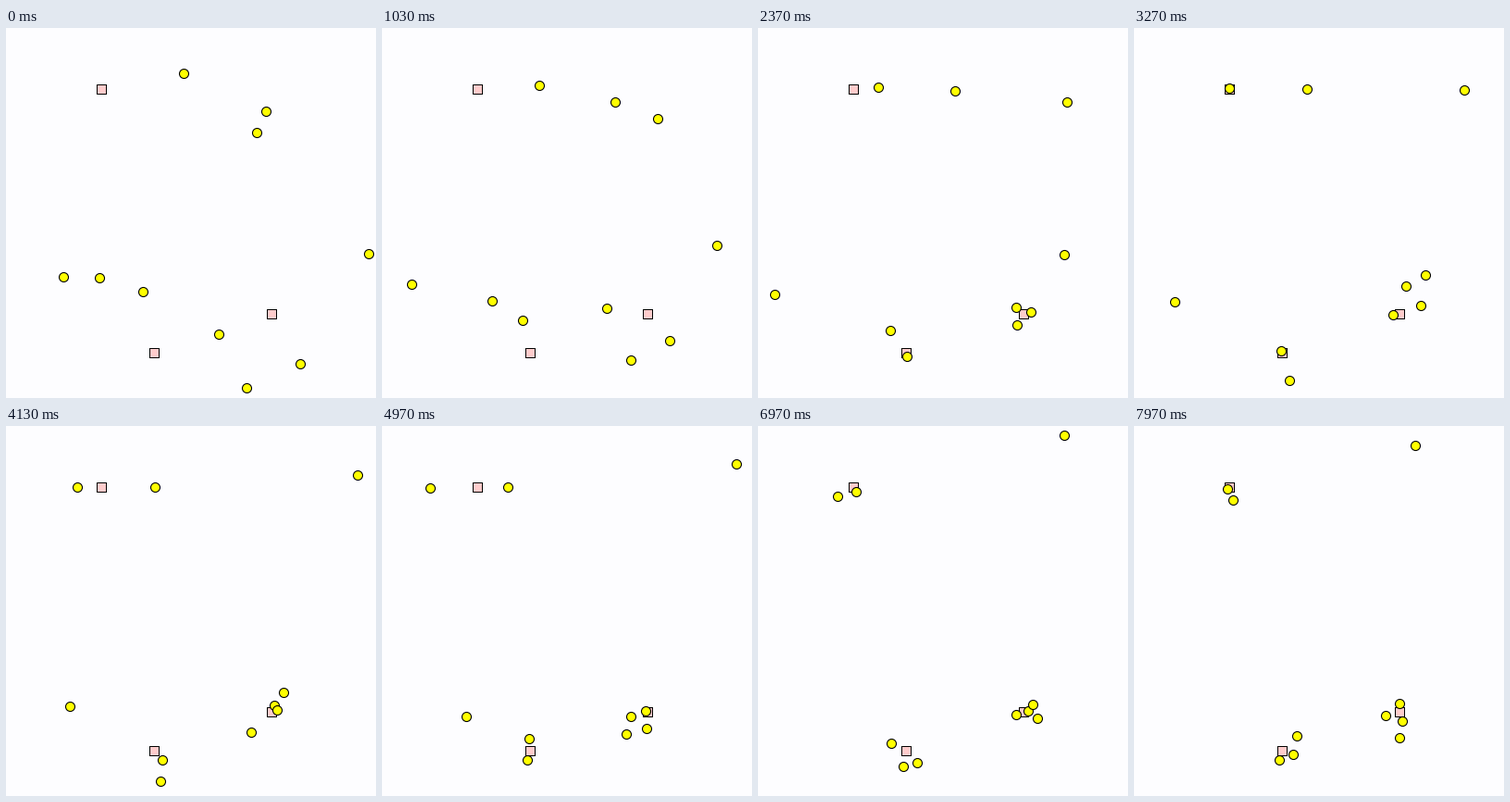
Recreate the animation shown at these times as a matplotlib script. Size 400x400 px, loop 8 s.

```python
import numpy as np
import matplotlib.pyplot as plt
from matplotlib.animation import FuncAnimation
from matplotlib.patches import Circle, Rectangle

SIZE, FRAMES, STEP_MS = 400, 400, 20
PX = 0.72  # one pixel in points at 100 dpi
STEPS_PER_MS = 0.03  # bees move 30 times a second, one pixel each time

plt.rcParams["toolbar"] = "None"
fig = plt.figure(figsize=(SIZE / 100, SIZE / 100), dpi=100, facecolor="#fdfdff")
ax = fig.add_axes([0, 0, 1, 1])
ax.set_xlim(0, SIZE)
ax.set_ylim(SIZE, 0)
ax.axis("off")

for x, y in [(103, 66), (287, 309), (160, 351)]:
    ax.add_patch(Rectangle((x - 5.5, y - 5.5), 10, 10, fc="#ffcccc", ec="black",
                           lw=PX, antialiased=False, zorder=1))

bees = []


def bee(*turns):
    """A bee flying straight at unit speed from one turning point to the next."""
    p = np.array(turns, float)
    reach = np.append(0, np.cumsum(np.hypot(*np.diff(p, axis=0).T)))
    dot = Circle(p[0], 5, fc="#ffff00", ec="black", lw=1.1 * PX, zorder=2)
    ax.add_patch(dot)
    bees.append((dot, reach, p))


# Upper square
bee((192, 49), (189, 61), (50, 67), (75, 62), (117, 74), (101, 68))
bee((281, 90), (207, 66), (86, 66), (86, 85), (108, 80))

# Bouncing off the walls only
bee((271, 113), (357, 67), (392, 46), (329, 9), (303, 22))

# Lower left square
bee((62, 269), (6, 284), (72, 304), (160, 351), (173, 355))
bee((101, 270), (171, 366), (158, 335), (170, 377), (176, 335))
bee((148, 285), (152, 317), (171, 395), (156, 359), (159, 345), (169, 339),
    (153, 378), (157, 361))

# Lower right square
bee((392, 244), (343, 229), (282, 312), (297, 285), (287, 337))
bee((230, 331), (245, 298), (279, 302), (295, 278), (285, 330), (297, 312),
    (299, 300), (273, 316), (287, 300))
bee((318, 363), (323, 353), (311, 340), (314, 324), (296, 309), (291, 300),
    (314, 300), (262, 316), (277, 304), (305, 316), (272, 313))
bee((260, 389), (285, 303), (257, 342), (264, 333), (275, 338), (280, 325),
    (290, 300), (304, 302), (290, 319))


def draw(n):
    step = round((n + 0.5) * STEP_MS * STEPS_PER_MS)
    for dot, reach, p in bees:
        x, y = (np.interp(step, reach, c) for c in p.T)
        dot.center = round(x) + 0.5, round(y) + 0.5
    return [dot for dot, _, _ in bees]


anim = FuncAnimation(fig, draw, frames=FRAMES, init_func=lambda: draw(0),
                     interval=STEP_MS, repeat=True, repeat_delay=0)
plt.show()
```
